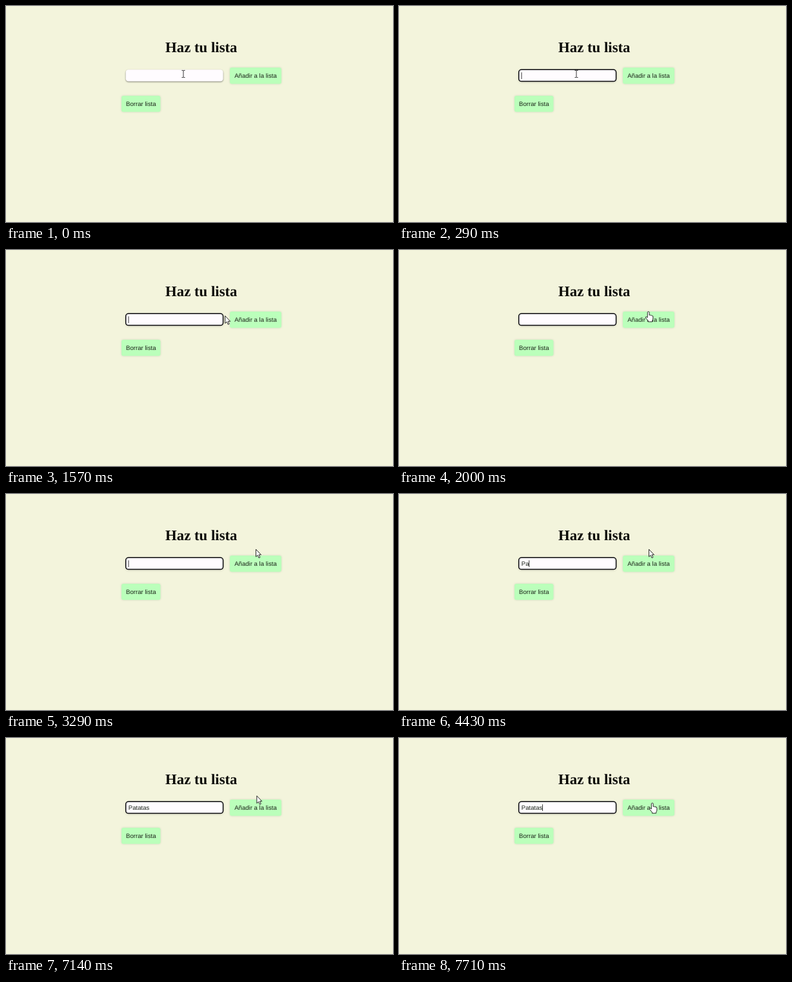
Write an HTML page that moves like this. It is 600 by 337 pixels and loops after 8 s.

```html
<!DOCTYPE html>
<html lang="es">
<head>
<meta charset="utf-8">
<title>Haz tu lista</title>
<style>
html, body { margin: 0; width: 100%; height: 100%; overflow: hidden; background: #f3f4dc; }
svg { display: block; width: 100%; height: 100%; }
text { font: 9.6px "Liberation Sans", Arial, sans-serif; fill: #1c241a; text-rendering: geometricPrecision; }
.title { font: bold 22.8px "Liberation Serif", "Times New Roman", serif; fill: #0b0b08; }
.mid { text-anchor: middle; }
.button { fill: #bbffbb; filter: drop-shadow(0 .8px 1.8px #0002); }
.field { fill: #fffcff; filter: drop-shadow(0 1.2px 1.3px #0007); }
.focused { stroke: #08080c; stroke-width: 1.5; filter: drop-shadow(0 1px 1.5px #0002); }
.pointer { fill: #fff; stroke: #111; stroke-width: .9; stroke-linejoin: round; }
</style>
</head>
<body>
<svg viewBox="0 0 600 337">
  <text class="title mid" x="302.8" y="72">Haz tu lista</text>
  <rect id="field" class="field" x="185.7" y="99.2" width="150.9" height="18.4" rx="4.2"/>
  <text id="typed" x="189.8" y="111.8"></text>
  <path id="caret" d="M190 103.5V114" stroke="#222" stroke-width=".9"/>
  <rect class="button" x="347" y="96" width="80" height="25.5" rx="3"/>
  <text class="mid" x="387" y="111.8">Añadir a la lista</text>
  <rect class="button" x="179" y="140" width="60.5" height="25.3" rx="3"/>
  <text class="mid" x="209.3" y="155.8">Borrar lista</text>
  <g id="cursor">
    <path id="beam" fill="none" stroke="#222" stroke-width=".9" d="M-2.5-5.5H-.8L0-4.9.8-5.5H2.5M0-4.9V4.9M-2.5 5.5H-.8L0 4.9.8 5.5H2.5"/>
    <path id="arrow" class="pointer" d="M0 0V11.6L2.7 9.2 4.5 13.4 6.4 12.6 4.6 8.5H8Z"/>
    <path id="hand" class="pointer" d="M-1.4 9.3V1.4Q-1.4 0 0 0T1.4 1.4V5.6Q2.8 4.7 3.8 6 5 5.3 5.7 6.5 7.2 6.2 7.2 7.8V10.7Q7.2 12.5 6 14V15.8H-.3V14.2L-4 9.9Q-4.8 8.7-3.9 8.1T-1.4 9.3Z"/>
  </g>
</svg>
<script>
const $ = id => document.getElementById(id);
const LOOP = 8000, FPS = 7, BLINK = 3.71, TEXT = "Patatas";

// Steps at which the field is focused and then each letter is typed
const keys = [.5, 26.5, 30.6, 32.5, 34.2, 41.5, 43.5, 45.8];

const progress = (step, from, to) => Math.min(1, Math.max(0, (step - from) / (to - from)));
const smooth = p => p * p * (3 - 2 * p);
const bezier = (p, a, b, c, d) => {
  const q = 1 - p;
  return q * q * q * a + 3 * q * q * p * b + 3 * q * p * p * c + p * p * p * d;
};
const show = (id, on) => $(id).style.display = on ? "" : "none";

// One sweep from the field to the button, later a short slide onto it
function pointerAt(step) {
  const sweep = progress(step, 7, 15), slide = smooth(progress(step, 48, 54));
  return [
    bezier(sweep, 275, 285, 400, 387.5) + 5.2 * slide,
    bezier(sweep, 106, 90, 120, 86.3) + 15.2 * slide
  ];
}

function draw(ms) {
  const step = Math.floor((ms + 4) * FPS / 1000);
  const count = keys.filter(k => k <= step).length;
  const focused = count > 0;

  $("field").classList.toggle("focused", focused);
  $("typed").textContent = TEXT.slice(0, Math.max(0, count - 1));
  $("caret").setAttribute("transform", `translate(${$("typed").getComputedTextLength()})`);
  show("caret", focused && (step - keys[count - 1]) % (2 * BLINK) < BLINK);

  const [x, y] = pointerAt(step);
  const overField = x < 337, overButton = x > 347 && y > 95;
  $("cursor").setAttribute("transform", `translate(${x} ${y})`);
  show("beam", overField);
  show("hand", overButton);
  show("arrow", !overField && !overButton);
}

function tick() {
  draw(performance.now() % LOOP);
  requestAnimationFrame(tick);
}
tick();
</script>
</body>
</html>
```
